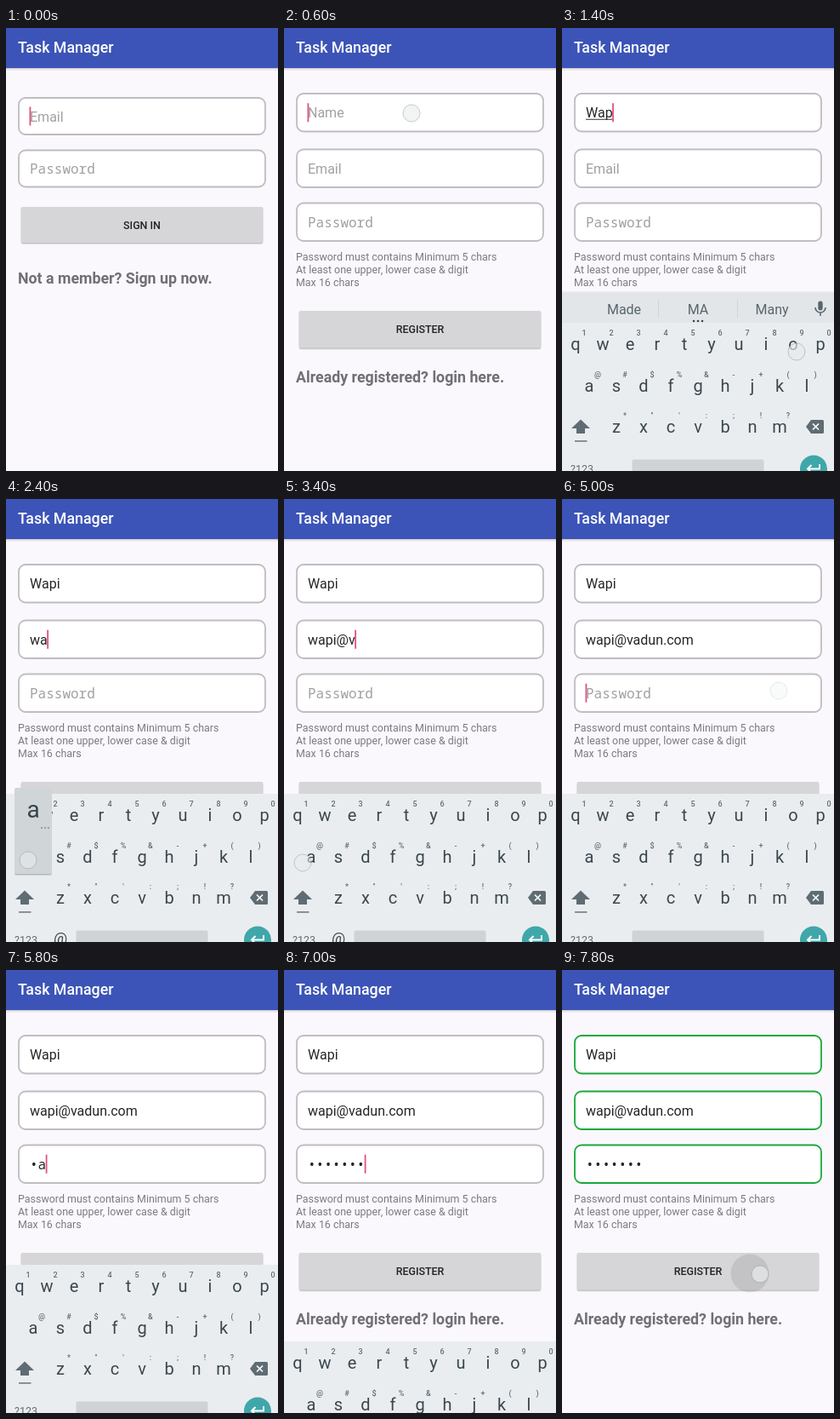
Animation, 320 px wide and 520 px high, one loop 8 s. Source, as an HTML page:

```html
<!DOCTYPE html>
<html lang="en">
<head>
<meta charset="utf-8">
<title>Task Manager sign-up</title>
<style>
  html, body { margin: 0; width: 100%; height: 100%; overflow: hidden; background: #faf8fc; }
  svg { display: block; width: 320px; height: 520px; font-family: Roboto, sans-serif; }
</style>
</head>
<body>
<svg id="stage" viewBox="0 0 320 520"></svg>
<script>
const STEP = 200, STEPS = 40;
const SANS = 'Roboto, sans-serif', MONO = "'Noto Sans Mono', monospace";
const NAME = 'Wapi', MAIL = 'wapi@vadun.com', PASS = 'Wapi123';

// Step at which each character appears
const NAME_AT = [5, 6, 7, 8];
const MAIL_AT = [11, 12, 13, 14, 15, 16, 18, 19, 20, 21, 22, 23, 23, 24];
const PASS_AT = [27, 28, 30, 31, 32, 33, 34];

// Keys held down with an enlarged preview
const PRESSED = {
  5: 'w', 6: 'a', 8: 'i', 11: 'w', 12: 'a', 13: 'p', 14: 'i', 16: 'v',
  18: 'a', 19: 'd', 20: 'u', 21: 'n', 23: 'o', 24: 'm',
  27: 'w', 28: 'a', 30: 'p', 31: 'i', 32: 'q', 33: 'w', 34: 'e'
};
// Other touches: x, y, opacity
const TOUCH = {
  1: [120, 295, .8], 3: [150, 100, .7], 7: [276, 380, .8], 9: [150, 165, .7],
  15: [64, 516, .8], 17: [22, 427, .7], 22: [252, 514, .8], 25: [255, 225, .3],
  26: [22, 470, .8], 37: [233, 357, .7], 38: [233, 357, .9], 39: [233, 357, .9]
};
const ROWS = [
  ['qwertyuiop', '1234567890', 16, 371],
  ['asdfghjkl', '@#$%&-+()', 32, 420],
  ['zxcvbnm', '*"\':;!?', 64, 468]
];
const keyPos = {};
for (const [keys, , x, y] of ROWS) [...keys].forEach((k, i) => keyPos[k] = [x + i * 32, y]);

const stage = document.getElementById('stage');
const pen = document.createElement('canvas').getContext('2d');
const textWidth = (s, font) => { pen.font = `16px ${font}`; return pen.measureText(s).width; };
const between = (s, a, b) => s >= a && s < b;
const typed = (text, at, s) => text.slice(0, at.filter(n => n <= s).length);

const rect = (x, y, w, h, fill, extra = '') =>
  `<rect x="${x}" y="${y}" width="${w}" height="${h}" fill="${fill}" ${extra}/>`;
const path = (d, extra) => `<path d="${d}" ${extra}/>`;
const circle = (x, y, r, fill, extra = '') => `<circle cx="${x}" cy="${y}" r="${r}" fill="${fill}" ${extra}/>`;
const text = (s, x, y, size, fill, extra = '') =>
  `<text x="${x}" y="${y}" font-size="${size}" fill="${fill}" ${extra}>${s.replace(/&/g, '&amp;')}</text>`;
const MID = 'text-anchor="middle"';
const shadow = (x, y, w, h) =>
  rect(x, y + 1, w, h + 1, '#000', 'rx="2" opacity=".12"') + rect(x + .5, y + 1, w - 1, h, '#000', 'rx="2" opacity=".12"');

function field(y, h, value, hint, { focus, mono, green, underline } = {}) {
  const mid = y + h / 2, base = mid + 6, font = mono ? MONO : SANS;
  const family = `font-family="${font}"`;
  const w = textWidth(value, font);
  let out = rect(15, y, 290, h, '#fff', `rx="8" stroke="${green ? '#1aa83c' : '#bfbcc2'}" stroke-width="1.8"`);
  out += value ? text(value, 28, base, 16, '#252528', family) : text(hint, 28, base, 16, '#a09fa4', family);
  if (underline) out += rect(28, base + 1.5, w, 1, '#333');
  if (focus) out += rect(27.5 + w, mid - 11, 1.8, 22, '#e0527f');
  return out;
}

const button = (y, h, label) =>
  shadow(17.5, y, 285, h) + rect(17.5, y, 285, h, '#d6d5d7', 'rx="2"') +
  text(label, 160, y + h / 2 + 4.5, 12.44, '#232326', `${MID} font-weight="500"`);
const footer = (s, y) => text(s, 14, y, 17.8, '#706f73', 'font-weight="700"');

const login = () =>
  field(82, 43, '', 'Email', { focus: true }) +
  field(143.5, 43, '', 'Password', { mono: true }) +
  button(210, 42, 'SIGN IN') + footer('Not a member? Sign up now.', 300);

function register(s) {
  const green = s >= 38;
  let pass = typed(PASS, PASS_AT, s);
  if (pass) pass = s >= 35 ? '•'.repeat(pass.length) : '•'.repeat(pass.length - 1) + pass.slice(-1);
  const help = ['Password must contains Minimum 5 chars', 'At least one upper, lower case & digit', 'Max 16 chars'];
  let out =
    field(77, 44.5, typed(NAME, NAME_AT, s), 'Name', { focus: between(s, 3, 10), underline: between(s, 5, 10), green }) +
    field(142.5, 44.5, typed(MAIL, MAIL_AT, s), 'Email', { focus: between(s, 10, 25), green }) +
    field(205.5, 44.5, pass, 'Password', { focus: between(s, 25, 37), mono: true, green }) +
    help.map((line, i) => text(line, 14, 273.3 + i * 14.6, 12.44, '#7b7a7e')).join('') +
    button(332, 43.5, 'REGISTER') + footer('Already registered? login here.', 416);
  if (green) out += circle(221, 356, s === 38 ? 14 : 22.5, '#000', 'opacity=".09"');
  return out;
}

const strip = () =>
  rect(0, 310, 320, 37, '#e3e6e8') + rect(0, 309, 320, 1.5, '#eeeef2') +
  ['Made', 'MA', 'Many'].map((w, i) => text(w, 73 + i * 87, 336, 16, '#59666d', MID)).join('') +
  rect(113, 319, 1, 21, '#cfd4d7') + rect(206, 319, 1, 21, '#cfd4d7') +
  [155, 160, 165].map(x => circle(x, 344, 1.3, '#3c474d')).join('') +
  rect(301.3, 320.5, 5.4, 11, '#59666d', 'rx="2.7"') +
  path('M298 328a6 6 0 0 0 12 0M304 334v4', 'fill="none" stroke="#59666d" stroke-width="1.6"');

function preview(key, caps) {
  const [kx, ky] = keyPos[key];
  const x = Math.max(0, Math.min(276, kx - 22)), y = ky - 81;
  return shadow(x, y, 44, 101) + rect(x, y, 44, 101, '#d0d5d8', 'rx="2"') +
    text(caps ? key.toUpperCase() : key, x + 22, y + 35, 28, '#37444b', MID) +
    [32, 36, 40].map(d => circle(x + d, y + 47, .9, '#7b868c')).join('');
}

function keyboard(s) {
  const ink = '#3a474e', soft = '#5f6c73';
  const caps = between(s, 4, 6) || between(s, 26, 28);
  let out = (s < 10 ? strip() : '') + rect(0, 346, 320, 174, '#eaedf0');
  for (const [keys, hints, x0, y] of ROWS) {
    [...keys].forEach((k, i) => {
      const x = x0 + i * 32;
      out += text(caps ? k.toUpperCase() : k, x, y + 7, 20, ink, MID) +
        text(hints[i], x + 10, y - 10.5, 9, soft, `${MID} font-weight="500"`);
    });
  }
  out += path('M22 459.5L33 470H27V476H17V470H11Z', `fill="${caps ? '#3ba6a6' : soft}"`) +
    rect(15, 484, 14.5, 1.8, '#7d888e') +
    path('M287 468L293 460H306.5Q308 460 308 461.5V474.5Q308 476 306.5 476H293Z', `fill="${soft}"`) +
    path('M295 464.5l7 7m0-7l-7 7', 'stroke="#fff" stroke-width="1.7"') +
    text('?123', 10, 522, 12.5, soft) +
    rect(82.5, 506.5, 155, 20, '#cfd3d6', 'rx="2"') +
    circle(296, 517.5, 16, '#3fa7aa') +
    path('M303 512v5.5H289m4.5-4.5l-4.5 4.5l4.5 4.5', 'fill="none" stroke="#fff" stroke-width="2"');
  if (between(s, 10, 25)) out += text('@', 64, 522, 18, ink, MID);
  if (PRESSED[s]) out += preview(PRESSED[s], caps);
  return out;
}

function finger(s) {
  let spot = TOUCH[s];
  if (PRESSED[s]) {
    const [x, y] = keyPos[PRESSED[s]];
    spot = [x - 6, y + 4, .8];
  }
  return spot
    ? circle(spot[0], spot[1], 10, '#e9eaeb', `fill-opacity=".8" stroke="#a9b5bb" stroke-width="1" opacity="${spot[2]}"`)
    : '';
}

function draw(s) {
  let out = rect(0, 0, 320, 520, '#faf8fc');
  if (s < 3) out += login();
  if (s === 2) out += `<g opacity=".7">${rect(0, 47, 320, 473, '#faf8fc')}${register(s)}</g>`;
  if (s > 2) out += register(s);
  out += rect(0, 46, 320, 4, '#000', 'opacity=".06"') + rect(0, 46, 320, 2, '#000', 'opacity=".12"') +
    rect(0, 0, 320, 47, '#3c54b7') +
    text('Task Manager', 14, 29.3, 17.8, '#fff', 'font-weight="500"');
  if (between(s, 4, 36)) {
    const drop = s === 4 ? 70 : s === 35 ? 90 : 0;
    out += `<g transform="translate(0 ${drop})">${keyboard(s)}</g>`;
  }
  stage.innerHTML = out + finger(s);
}

let shown = -1;
function tick() {
  const s = Math.floor(performance.now() / STEP) % STEPS;
  if (s !== shown) draw(shown = s);
  requestAnimationFrame(tick);
}
tick();
</script>
</body>
</html>
```
